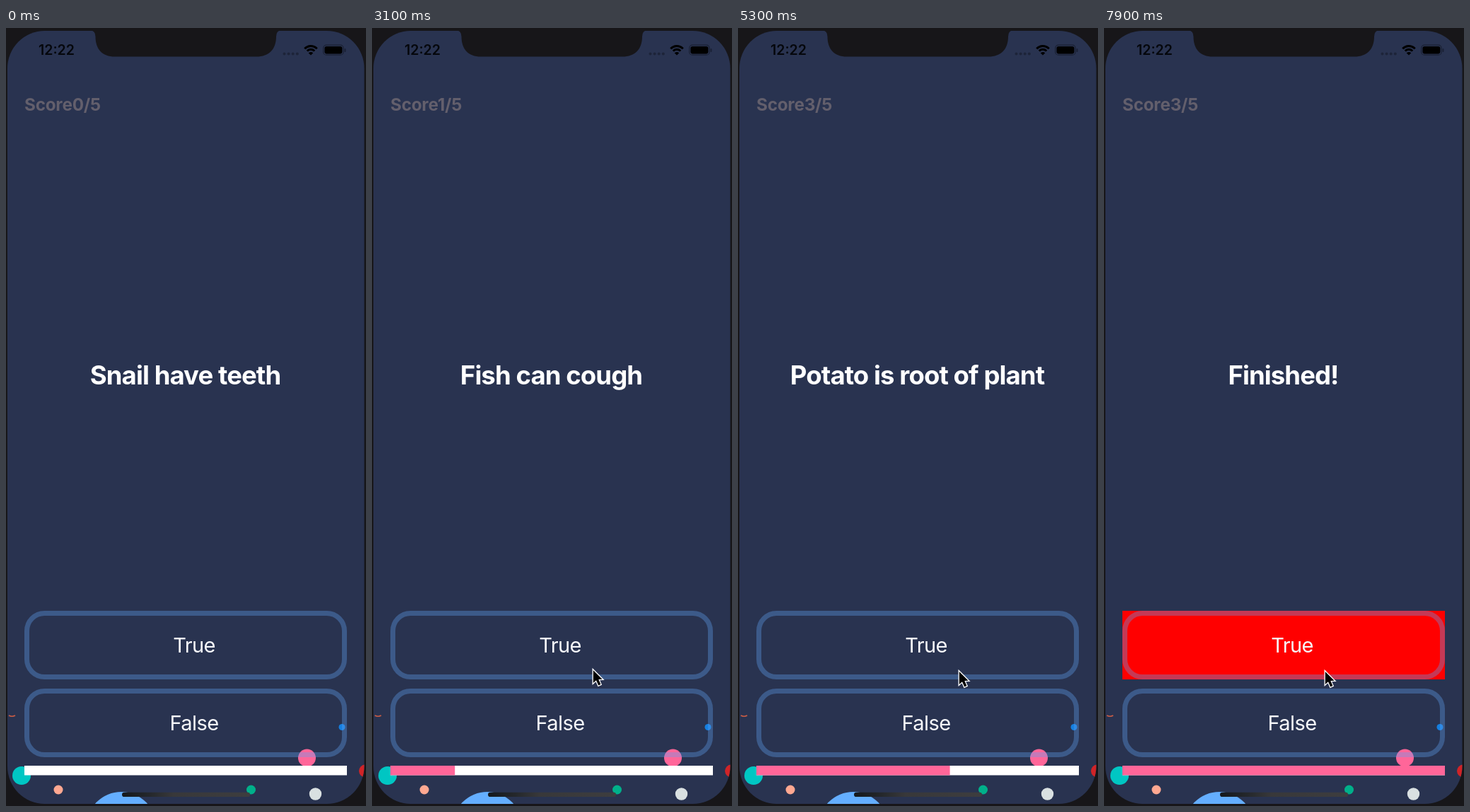
Write an HTML page with a canvas that moves like this. It is 509x1100 px and loops after 8000 ms.

```html
<!DOCTYPE html>
<html lang="en">
<head>
<meta charset="utf-8">
<title>Quiz</title>
<style>
html, body { margin: 0; width: 100%; height: 100%; overflow: hidden; background: #171619; }
canvas { display: block; width: 509px; height: 1100px; }
</style>
</head>
<body>
<canvas id="stage"></canvas>
<script>
const W = 509, H = 1100, LOOP = 8000;
const canvas = document.getElementById('stage');
const scale = window.devicePixelRatio || 1;
canvas.width = W * scale;
canvas.height = H * scale;
const ctx = canvas.getContext('2d');

const BG = '#293350', FRAME = '#171619', PINK = '#ff6699';
const BORDER = 'rgba(94,157,238,0.36)';
const GREEN = '#00ff00', RED = '#ff0000';

const steps = [
  { at: 0, score: 0, lines: ['Snail have teeth'] },
  { at: 1500, score: 1, lines: ['Fish can cough'] },
  { at: 3900, score: 2, lines: ['Tomato is vegitable'] },
  { at: 5200, score: 3, lines: ['Potato is root of plant'] },
  { at: 6300, score: 3, lines: ['Weldrin Macory was born', 'in London'] },
  { at: 7400, score: 3, lines: ['Finished!'] }
];

const flashes = [
  { from: 1200, to: 1500, color: GREEN },
  { from: 3600, to: 3900, color: GREEN },
  { from: 4900, to: 5200, color: GREEN },
  { from: 6000, to: 6300, color: RED },
  { from: 7100, to: LOOP, color: RED }
];

// time, x, y of the pointer tip
const path = [
  [100, 468, 1058], [900, 322, 889], [2000, 322, 889], [2400, 316, 899],
  [2700, 316, 899], [3100, 312, 907], [3400, 312, 907], [3700, 312, 909]
];

const bubbles = [
  [22, 1057, 13, '#00c6c3'], [74, 1077, 6.5, '#ffa891'], [163, 1129, 49, '#64aeff'],
  [346.5, 1077, 6.5, '#00b08a'], [437.5, 1083, 8.7, '#d9e0e1'], [508, 1050.5, 9, '#d02428'],
  [425.5, 1032, 12.5, PINK], [475, 988.5, 4.5, '#157fe0']
];

function box(x, y, w, h, r, color) {
  ctx.fillStyle = color;
  ctx.beginPath();
  ctx.roundRect(x, y, w, h, r);
  ctx.fill();
}

function disc(x, y, r, color) {
  ctx.fillStyle = color;
  ctx.beginPath();
  ctx.arc(x, y, r, 0, Math.PI * 2);
  ctx.fill();
}

function label(str, x, y, size, weight, color, align, spacing) {
  ctx.font = `${weight} ${size}px Inter, sans-serif`;
  ctx.letterSpacing = `${spacing}px`;
  ctx.textAlign = align;
  ctx.fillStyle = color;
  ctx.fillText(str, x, y);
}

function drawScreen() {
  ctx.fillStyle = FRAME;
  ctx.fillRect(0, 0, W, H);
  box(2, 4, 504.5, 1093, 53, BG);
}

function drawBubbles() {
  ctx.save();
  ctx.beginPath();
  ctx.roundRect(2, 4, 504.5, 1093, 53);
  ctx.clip();
  bubbles.forEach(b => disc(...b));
  ctx.strokeStyle = '#c95c45';
  ctx.lineWidth = 1.6;
  ctx.beginPath();
  ctx.moveTo(4, 972);
  ctx.quadraticCurveTo(8.5, 974.5, 13, 972);
  ctx.stroke();
  ctx.restore();
}

function drawNotch() {
  ctx.fillStyle = FRAME;
  ctx.beginPath();
  ctx.moveTo(119, 3);
  ctx.quadraticCurveTo(126.5, 4, 126.5, 12);
  ctx.bezierCurveTo(126.5, 30, 136, 40.5, 154, 40.5);
  ctx.lineTo(354, 40.5);
  ctx.bezierCurveTo(372, 40.5, 382, 30, 382, 12);
  ctx.quadraticCurveTo(382, 4, 389, 3);
  ctx.fill();
}

function drawStatus() {
  label('12:22', 46, 38, 19.5, 600, '#05070c', 'left', 0);
  for (let i = 0; i < 4; i++) disc(393.5 + i * 6.1, 36.5, 2, '#1d2439');
  ctx.strokeStyle = '#000';
  ctx.lineWidth = 3;
  for (const r of [12, 7.2]) {
    ctx.beginPath();
    ctx.arc(431, 37.5, r, -Math.PI * 0.76, -Math.PI * 0.24);
    ctx.stroke();
  }
  ctx.fillStyle = '#000';
  ctx.beginPath();
  ctx.moveTo(431, 38.5);
  ctx.arc(431, 38.5, 4.6, -Math.PI * 0.76, -Math.PI * 0.24);
  ctx.fill();
  ctx.strokeStyle = '#1a2033';
  ctx.lineWidth = 1.2;
  ctx.beginPath();
  ctx.roundRect(448.6, 24.2, 28.6, 14, 4.5);
  ctx.stroke();
  box(450.4, 26, 25, 10.4, 2.8, '#000');
  box(478.6, 29, 1.8, 5, 1, '#1a2033');
}

function drawButton(y, text, fill) {
  if (fill) {
    ctx.fillStyle = fill;
    ctx.fillRect(26, y, 456, 97);
  }
  ctx.strokeStyle = BORDER;
  ctx.lineWidth = 7;
  ctx.beginPath();
  ctx.roundRect(29.5, y + 3.5, 449, 90, 25);
  ctx.stroke();
  label(text, 266, y + 59, 29, 400, '#f7f8fb', 'center', -0.6);
}

function drawBar(part) {
  ctx.fillStyle = '#fff';
  ctx.fillRect(26, 1043, 456, 13.5);
  ctx.fillStyle = PINK;
  ctx.fillRect(26, 1043, 456 * part, 13.5);
}

function drawHome() {
  const g = ctx.createLinearGradient(164, 0, 345, 0);
  g.addColorStop(0, '#15181c');
  g.addColorStop(0.22, '#25282c');
  g.addColorStop(0.4, '#38383a');
  g.addColorStop(1, '#3d3d3f');
  box(164, 1080.8, 181, 6.2, 3.1, g);
}

function drawPointer(t) {
  if (t < path[0][0]) return;
  let i = 0;
  while (i < path.length - 2 && t >= path[i + 1][0]) i++;
  const [t0, x0, y0] = path[i], [t1, x1, y1] = path[i + 1];
  const k = Math.min(1, (t - t0) / (t1 - t0));
  const e = k * k * (3 - 2 * k);
  ctx.save();
  ctx.translate(x0 + (x1 - x0) * e, y0 + (y1 - y0) * e);
  ctx.beginPath();
  [[0.8, 1], [0.8, 19], [5, 15.2], [8.2, 22.5], [11.4, 21.1], [8.3, 14], [13.6, 13.8]]
    .forEach(p => ctx.lineTo(...p));
  ctx.closePath();
  ctx.lineJoin = 'miter';
  ctx.strokeStyle = '#fff';
  ctx.lineWidth = 2.6;
  ctx.stroke();
  ctx.fillStyle = '#000';
  ctx.fill();
  ctx.restore();
}

function draw(t) {
  const index = steps.findLastIndex(s => t >= s.at);
  const step = steps[index];
  const flash = flashes.find(f => t >= f.from && t < f.to);
  const tall = step.lines.length > 1;

  ctx.setTransform(scale, 0, 0, scale, 0, 0);
  drawScreen();
  drawBubbles();
  drawNotch();
  drawStatus();
  label(`Score${step.score}/5`, 26, tall ? 110 : 116.5, 24.3, 700, '#635f6c', 'left', -0.25);
  step.lines.forEach((line, i) =>
    label(line, 253.5, (tall ? 476 : 504) + i * 43.5, 36.5, 700, '#fff', 'center', -0.9));
  drawButton(824, 'True', flash && flash.color);
  drawButton(934, 'False');
  drawBar(index / 5);
  drawHome();
  drawPointer(t);
}

const start = performance.now();
function tick() {
  draw((performance.now() - start) % LOOP);
  requestAnimationFrame(tick);
}
tick();
</script>
</body>
</html>
```
